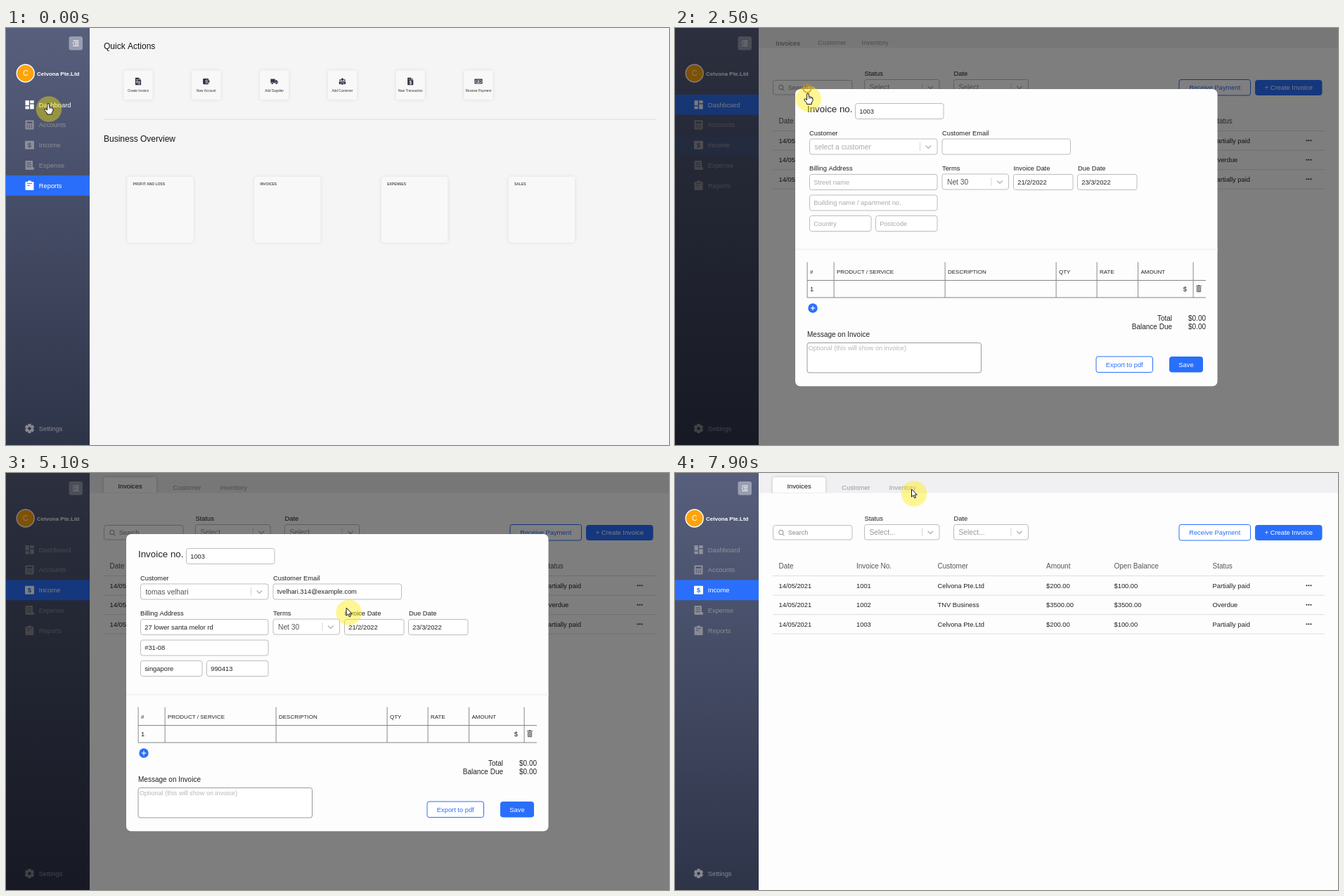
These frames come from a looping animation (943x594 px, 8 s). An HTML page with a canvas:

```html
<!DOCTYPE html>
<html lang="en">
<head>
<meta charset="utf-8">
<title>Accounting dashboard</title>
<style>
html, body { margin: 0; width: 100%; height: 100%; overflow: hidden; background: #f5f5f5; }
canvas { display: block; }
</style>
</head>
<body>
<canvas id="stage" width="943" height="594"></canvas>
<script>
const W = 943, H = 594, LOOP = 8000, TAU = Math.PI * 2;
const ctx = document.getElementById('stage').getContext('2d');
const FONT = '"Liberation Sans", Arial, sans-serif';
const BLUE = '#2a6ffb', INK = '#2f3447', GREY = '#d2d2d2', TEAL = '#00c4ac';
const FIRM = 'Celvona Pte.Ltd', CLIENT = 'tomas velhari';

const OPEN = 2450, CLOSE = 7260, PICK = 4600, ADD = 6380;

const clamp = v => Math.max(0, Math.min(1, v));
const ramp = (t, a, b) => clamp((t - a) / (b - a));
const outQuad = p => 1 - (1 - p) ** 2;
const outQuart = p => 1 - (1 - p) ** 4;
const smooth = p => p * p * (3 - 2 * p);
const mix = (a, b, p) => a + (b - a) * p;

function text(s, x, y, size = 9.33, color = '#222', align = 'left', weight = '') {
  ctx.font = `${weight} ${size}px ${FONT}`;
  ctx.fillStyle = color;
  ctx.textAlign = align;
  ctx.fillText(s, x, y + size * 0.355);
}
function rect(x, y, w, h, color) {
  ctx.fillStyle = color;
  ctx.fillRect(x, y, w, h);
}
function box(x0, y0, x1, y1, r, fill, stroke, width = 1) {
  ctx.beginPath();
  ctx.roundRect(x0, y0, x1 - x0, y1 - y0, r);
  if (fill) { ctx.fillStyle = fill; ctx.fill(); }
  if (stroke) { ctx.strokeStyle = stroke; ctx.lineWidth = width; ctx.stroke(); }
}
function line(points, color, width = 1) {
  ctx.beginPath();
  points.forEach(([x, y]) => ctx.lineTo(x, y));
  ctx.strokeStyle = color;
  ctx.lineWidth = width;
  ctx.stroke();
}
function disc(x, y, r, color) {
  ctx.beginPath();
  ctx.arc(x, y, r, 0, TAU);
  ctx.fillStyle = color;
  ctx.fill();
}
function shadowed(blur, alpha, draw) {
  ctx.save();
  ctx.shadowColor = `rgba(0,0,0,${alpha})`;
  ctx.shadowBlur = blur;
  draw();
  ctx.restore();
}
function at(x, y, scale, draw) {
  ctx.save();
  ctx.translate(x, y);
  ctx.scale(scale, scale);
  draw();
  ctx.restore();
}
function chevron(x, y, color) {
  line([[x - 3.8, y - 1.9], [x, y + 1.9], [x + 3.8, y - 1.9]], color, 1.4);
}

// ---- sidebar ----
const navIcons = [
  c => { rect(-6, -6, 5.3, 7, c); rect(-6, 2.3, 5.3, 4, c); rect(.7, -6, 5.5, 4, c); rect(.7, -.7, 5.5, 7, c); },
  (c, bg) => {
    box(-6, -6.5, 6, 6.5, 1, c);
    rect(-4, -4.5, 8, 2.4, bg);
    for (let i = 0; i < 9; i++) rect(-4 + i % 3 * 3, -.5 + (i / 3 | 0) * 2, 1.8, 1.2, bg);
  },
  (c, bg) => { box(-6.5, -6, 6.5, 6, 1, c); text('$', 0, 0, 9.5, bg, 'center', 'bold'); },
  (c, bg) => {
    box(-6, -6.5, 4.5, 6.5, 1, c);
    for (let i = 0; i < 3; i++) rect(-4, -4 + i * 2.7, 6.5, 1, bg);
    disc(4.5, 4.5, 2.2, c);
  },
  (c, bg) => {
    box(-6, -5.5, 6, 6.5, 1, c);
    box(-2.5, -7, 2.5, -3.5, 1, c);
    rect(-3.5, -3.6, 7, 1, bg);
    rect(-3.5, -.6, 4, 1, bg);
  },
  (c, bg) => {
    for (let i = 0; i < 6; i++) {
      ctx.save(); ctx.rotate(i * TAU / 6); rect(-2.2, -6.6, 4.4, 4, c); ctx.restore();
    }
    disc(0, 0, 5, c); disc(0, 0, 2.2, bg);
  }
];
const navNames = ['Dashboard', 'Accounts', 'Income', 'Expense', 'Reports', 'Settings'];

function sidebarWidth(t) {
  const shut = smooth(ramp(t, 1000, 1200)), back = outQuad(ramp(t, 1600, 1780));
  return 119 - 79 * (shut - back);
}
function sidebar(t, sw) {
  ctx.save();
  ctx.beginPath();
  ctx.rect(0, 0, sw, H);
  ctx.clip();
  const g = ctx.createLinearGradient(0, 0, 0, H);
  g.addColorStop(0, '#575f7d');
  g.addColorStop(1, '#2e3448');
  rect(0, 0, sw, H, g);

  box(sw - 29.5, 12, sw - 10, 31.5, 3, 'rgba(255,255,255,.4)');
  for (let i = 0; i < 4; i++) {
    const inner = i % 3 ? 2.5 : 0;
    rect(sw - 23.5 + inner, 17.7 + i * 2.4, 8 - inner, 1, '#fff');
  }
  line([[sw - 22, 20], [sw - 24, 21.8], [sw - 22, 23.6]], '#fff', .9);

  const show = ramp(sw, 55, 95), ax = Math.max(20, sw / 2 - 31.8);
  disc(ax, 64.5, 13.2, '#fff');
  disc(ax, 64.5, 11.8, '#ffa30a');
  text('C', ax, 64.5, 10.5, '#fff', 'center');
  ctx.globalAlpha = show;
  text(FIRM, ax + 16.3, 64.7, 8, '#fff', 'left', 'bold');
  ctx.globalAlpha = 1;

  const first = ramp(t, 0, 250), second = ramp(t, 2470, 2750);
  const active = [first * (1 - second), 0, second, 0, 1 - first, 0];
  const hover = [t < 420 ? 1 : 0, 0, 0, 0, 0, 0];
  const ix = 20 + 13.5 * ((sw - 40) / 79) ** 2.5;
  navNames.forEach((name, i) => {
    const y = i < 5 ? 109.2 + i * 28.8 : 570.5;
    ctx.globalAlpha = active[i];
    rect(0, y - 14.4, sw, 28.8, BLUE);
    ctx.globalAlpha = 1;
    const lit = Math.max(active[i], hover[i]);
    const shade = Math.round(mix(146 - i * 2, 255, lit));
    const color = `rgb(${shade},${shade},${Math.min(255, shade + 8)})`;
    const back = active[i] > .5 ? BLUE : i < 5 ? '#4b5370' : '#30364b';
    at(ix, y, 1, () => navIcons[i](color, back));
    ctx.globalAlpha = show;
    text(name, ix + 13.3, y, 9.33, color);
    ctx.globalAlpha = 1;
  });
  ctx.restore();
}

// ---- dashboard ----
function sheet() {
  ctx.beginPath();
  ctx.moveTo(-7, -9); ctx.lineTo(2, -9); ctx.lineTo(7, -4); ctx.lineTo(7, 9); ctx.lineTo(-7, 9);
  ctx.fillStyle = INK;
  ctx.fill();
  line([[2, -9], [2, -4], [7, -4]], '#f8f8f8', 1);
}
const quick = [
  ['Create Invoice', () => {
    sheet();
    rect(-4.5, -5, 4, 1.2, '#f8f8f8'); rect(-4.5, -2.5, 4, 1.2, '#f8f8f8');
    rect(-4.5, 0, 9, 4, '#f8f8f8'); rect(-3.3, 1.2, 6.6, 1.6, INK); rect(0, 5.8, 4.5, 1.2, '#f8f8f8');
  }],
  ['New Account', () => {
    box(-8, -7, 6, 7, 2, INK);
    box(-1.5, -4, 9, 4, 1.5, '#f8f8f8');
    box(-.2, -3, 8, 3, 1, INK);
    disc(3, 0, 1.2, '#f8f8f8');
  }],
  ['Add Supplier', () => {
    rect(-9, -6, 11, 10, INK);
    ctx.beginPath();
    ctx.moveTo(2.5, -3); ctx.lineTo(6, -3); ctx.lineTo(9, 1); ctx.lineTo(9, 4.5); ctx.lineTo(2.5, 4.5);
    ctx.fill();
    for (const x of [-5, 5]) { disc(x, 4.5, 3, '#f8f8f8'); disc(x, 4.5, 2.2, INK); }
  }],
  ['Add Customer', () => {
    for (const x of [-5.5, 5.5]) { disc(x, -3, 2, INK); box(x - 2.5, 0, x + 2.5, 7, 2, INK); }
    box(-4, .5, 4, 9, 3, '#f8f8f8');
    disc(0, -5, 3, INK);
    box(-3.2, -.8, 3.2, 8, 2.5, INK);
    rect(-.5, 0, 1, 5, '#f8f8f8');
  }],
  ['New Transaction', () => {
    sheet();
    rect(-4.5, -5.8, 4, 1.1, '#f8f8f8');
    text('$', 0, 2.3, 11, '#f8f8f8', 'center', 'bold');
  }],
  ['Receive Payment', () => {
    box(-9.5, -6, 9.5, 6, 1, INK);
    box(-7.5, -4, 7.5, 4, 3, '#f8f8f8');
    box(-6.3, -3, 6.3, 3, 2.5, INK);
    disc(0, 0, 2.6, '#f8f8f8');
    rect(-.6, -1.5, 1.2, 3, INK);
  }]
];

function legend(y, label, color) {
  ctx.font = `8px ${FONT}`;
  const half = (ctx.measureText(label).width + 30) / 2;
  rect(-half, y - 3.6, 25.5, 7, color);
  text(label, -half + 30, y, 8, '#666');
}
function ringChart(part, color, hole, p) {
  const y = 28, top = -Math.PI / 2, cut = top + TAU * part * p;
  const slice = (from, to, fill) => {
    ctx.beginPath();
    ctx.arc(0, y, 48, from, to);
    if (hole) ctx.arc(0, y, hole, to, from, true); else ctx.lineTo(0, y);
    ctx.closePath();
    ctx.fillStyle = fill;
    ctx.fill();
    ctx.strokeStyle = '#fff';
    ctx.lineWidth = 1.4;
    ctx.stroke();
  };
  if (p <= 0) return;
  slice(top, cut, GREY);
  slice(cut, top + TAU * p, color);
}
function barChart(p) {
  box(-28.5, -22, -1.5, -14, 0, BLUE, '#111', 1.4);
  text('invoice', 2.5, -18, 8, '#666');
  [100, 50, 0].forEach((v, i) => {
    const y = -7.5 + i * 13.4;
    text(v, -51.5, y, 8, '#666', 'right');
    rect(-48, y, 114, .8, i < 2 ? '#e7e7e7' : '#d4d4d4');
  });
  for (const x of [-44.3, 10.7, 65.8]) rect(x, -7.5, .8, 31, '#e4e4e4');
  [['Overdue', 17.2, -16.5], ['Deposited', 15.6, 38.8]].forEach(([name, h, x]) => {
    const top = 19.5 - h * p;
    rect(x - 20, top, 40, h * p, BLUE);
    line([[x - 20, 19.5], [x - 20, top], [x + 20, top], [x + 20, 19.5]], '#111', 1.4);
    text(name, x, 31.5, 8, '#666', 'center');
  });
}
const cards = [
  ['PROFIT AND LOSS', p => {
    legend(-46.8, 'income', GREY); legend(-32.2, 'Expense', BLUE); ringChart(.52, BLUE, 24.5, p);
  }],
  ['INVOICES', barChart],
  ['EXPENSES', p => {
    legend(-46.8, '$100.00 Cost of Sales', GREY); legend(-32.2, '$20.00 Expense', TEAL); ringChart(.2, TEAL, 24.5, p);
  }],
  ['SALES', p => {
    legend(-46.8, 'income', GREY); legend(-32.2, 'Expense', BLUE); ringChart(.52, BLUE, 0, p);
  }]
];

function dashboard(t, sw) {
  const left = sw + 20, grow = mix(.58, 1, outQuad(ramp(t, 0, 280)));
  rect(0, 0, W, H, '#f5f5f5');
  text('Quick Actions', left, 25.3, 12, '#151515');
  text('Business Overview', left, 157.3, 12, '#151515');
  rect(left, 129.7, 924 - left, 1, '#dcdcdc');
  const step = 96.8 + (119 - sw) * .0375;
  quick.forEach(([name, icon], i) => at(sw + 69 + i * step, 81.2, grow, () => {
    shadowed(5, .1, () => box(-35.5, -35.5, 35.5, 35.5, 6, '#f8f8f8'));
    at(0, -8.8, 1, icon);
    text(name, 0, 14.5, 8, '#333', 'center');
  }));
  const chart = outQuart(ramp(t, 90, 800));
  cards.forEach(([name, draw], i) => at(sw + 100.5 + i * 180.8, 258.7, grow, () => {
    shadowed(5, .1, () => box(-81, -80.5, 81, 80.5, 7, '#f8f8f8'));
    text(name, -66.8, -62.3, 8.56, '#555', 'left', 'bold');
    if (t >= 90) draw(chart);
  }));
}

// ---- income page ----
function select(x0, y0, x1, y1, label, color, sep = x1 - 25) {
  box(x0, y0, x1, y1, 3, '#fff', '#bdbdbd');
  text(label, x0 + 7, (y0 + y1) / 2, 10.25, color);
  rect(sep, y0 + 5, .8, y1 - y0 - 10, '#ccc');
  chevron(x1 - 12.6, (y0 + y1) / 2 + .3, '#b5b5b5');
}
function button(x0, y0, x1, y1, label, solid) {
  box(x0, y0, x1, y1, 3, solid ? BLUE : '#fff', BLUE);
  text(label, (x0 + x1) / 2, (y0 + y1) / 2, 9.33, solid ? '#fff' : BLUE, 'center');
}
function incomePage(t) {
  rect(0, 0, W, H, '#fdfdfd');
  rect(119, 0, W - 119, 28.5, '#f0f0f2');
  const p = smooth(ramp(t, 2500, 2680));
  ctx.globalAlpha = p;
  ctx.save();
  ctx.beginPath();
  ctx.rect(119, 0, 300, 28.5);
  ctx.clip();
  shadowed(4, .2, () => box(139, 6, mix(182, 214, p), 34, 4, '#fdfdfd'));
  ctx.restore();
  ctx.globalAlpha = 1;
  const ink = Math.round(mix(110, 20, p));
  text('Invoices', mix(160.7, 176.5, p), mix(21.5, 19, p), 9.33, `rgb(${ink},${ink},${ink})`, 'center');
  text('Customer', mix(223.5, 257.5, p), 21, 9.33, '#999', 'center');
  text('Inventory', mix(284.5, 323.7, p), 21, 9.33, '#999', 'center');

  text('Status', 269.5, 64.3);
  text('Date', 396.5, 64.3);
  box(139.5, 74.5, 252, 95, 3, '#fff', '#bdbdbd');
  ctx.beginPath();
  ctx.arc(150.8, 84.5, 3.2, 0, TAU);
  ctx.strokeStyle = '#888';
  ctx.lineWidth = 1;
  ctx.stroke();
  line([[153, 87], [155.5, 89.5]], '#888');
  text('Search', 160.8, 84.8, 9, '#888');
  select(269.5, 73.5, 376, 95, 'Select...', '#999');
  select(396.5, 73.5, 502.5, 95, 'Select...', '#999');
  button(717, 73.5, 818.5, 96, 'Receive Payment', false);
  button(825.5, 74.5, 920, 95.5, '+ Create Invoice', true);

  const cols = [147.5, 258, 373.5, 528, 624.5, 764.5];
  ['Date', 'Invoice No.', 'Customer', 'Amount', 'Open Balance', 'Status']
    .forEach((s, i) => text(s, cols[i], 132.5, 10, '#555'));
  const part = n => ['14/05/2021', n, FIRM, '$200.00', '$100.00', 'Partially paid'];
  [part('1001'), ['14/05/2021', '1002', 'TNV Business', '$3500.00', '$3500.00', 'Overdue'], part('1003')]
    .forEach((row, r) => {
      const y = 160.2 + r * 27.5;
      row.forEach((s, i) => text(s, cols[i], y));
      for (let i = -1; i < 2; i++) disc(901.5 + i * 3, y, 1, '#222');
      rect(139, y + 13.4, 785, 1, '#dedede');
    });
  rect(139, 146, 785, 1, '#dedede');
}

// ---- invoice form ----
function field(x0, y0, x1, value, hint) {
  box(x0 + .5, y0 + .5, x1, y0 + 22.5, 3, '#fff', '#bcbcbc');
  text(value || hint || '', x0 + 6.2, y0 + 11.6, 9.33, value ? '#222' : '#aaa');
}
function trash(x, y) {
  rect(x - 4, y - 4.2, 8, 1.2, '#666');
  rect(x - 1.4, y - 5.2, 2.8, 1.2, '#666');
  box(x - 3.2, y - 2.4, x + 3.2, y + 5, 1, '#777');
  for (const d of [-1.8, 0, 1.8]) rect(x + d - .3, y - 1.4, .6, 5, '#ddd');
}
function modal(t, pointerY) {
  rect(0, 0, W, H, 'rgba(0,0,0,.5)');
  const rows = t >= ADD ? 2 : 1, extra = (rows - 1) * 24, done = t >= PICK;
  const menu = t >= 3750 && !done;
  ctx.save();
  ctx.translate(0, -extra / 2);
  box(171, 87, 771.5, 510.3 + extra, 7, '#fdfdfd');
  text('Invoice no.', 188, 115.5, 13.33);
  field(256, 107, 382, '1003');

  text('Customer', 191, 149.5);
  text('Customer Email', 380, 149.5);
  select(191.5, 158, 373, 180, done ? CLIENT : 'select a customer', done ? '#555' : '#aaa');
  field(379.5, 157.5, 562.5, done && 'tvelhari.314@example.com');
  text('Billing Address', 191, 199.7);
  field(191, 208, 373, done && '27 lower santa melor rd', 'Street name');
  field(191, 237.5, 373, done && '#31-08', 'Building name / apartment no.');
  field(191, 267, 279, done && 'singapore', 'Country');
  field(285, 267, 373, done && '990413', 'Postcode');
  text('Terms', 380, 199.7);
  select(380, 208, 474.5, 230, 'Net 30', '#555');
  text('Invoice Date', 481.5, 199.7);
  field(481, 208, 566, '21/2/2022');
  text('Due Date', 573, 199.7);
  field(572, 208, 657, '23/3/2022');
  rect(171, 314, 600.5, 3, '#f5f5f5');

  const bars = [188, 226, 384, 542, 600, 658.5, 737];
  ['#', 'PRODUCT / SERVICE', 'DESCRIPTION', 'QTY', 'RATE', 'AMOUNT']
    .forEach((s, i) => text(s, bars[i] + 4, 347, 8));
  for (const x of bars) rect(x - .4, 333.5, 1, 50.5 + extra, '#8a8a8a');
  rect(188, 359, 567, 1, '#858585');
  for (let r = 0; r < rows; r++) {
    const y = 372 + r * 24.2;
    text(r + 1, 192, y);
    text('$', 728, y, 9.33, '#222', 'right');
    trash(745, y - .8);
    rect(188, y + 11.5, 567, 1, '#858585');
  }

  ctx.translate(0, extra);
  disc(196, 399, 6.7, BLUE);
  rect(192.8, 398.4, 6.4, 1.2, '#fff');
  rect(195.4, 395.8, 1.2, 6.4, '#fff');
  text('Total', 707, 413.8, 10, '#222', 'right');
  text('$0.00', 755, 413.8, 10, '#222', 'right');
  text('Balance Due', 707, 425.5, 10, '#222', 'right');
  text('$0.00', 755, 425.5, 10, '#222', 'right');
  text('Message on Invoice', 188, 436.8, 10);
  box(188, 448.5, 435.5, 491, 3, '#fff', '#999');
  text('Optional (this will show on invoice)', 189.7, 455.8, 9.12, '#b3bab8');
  button(599, 468, 679.5, 490.5, 'Export to pdf', false);
  button(703.5, 468.5, 750.5, 490, 'Save', true);
  ctx.restore();

  if (menu) {
    box(191.5, 158, 373, 180, 3, null, BLUE, 1.7);
    rect(197, 163, .9, 12, '#333');
    chevron(360.4, 169.3, '#555');
    shadowed(5, .3, () => box(191, 185, 373, 226, 3, '#fff'));
    const low = pointerY > 205;
    rect(191, low ? 205 : 187, 182, 18, '#dee9fc');
    text('nils vorn', 194.5, 196.3);
    text(CLIENT, 194.5, 213.8);
  }
}

// ---- pointer: time and centre of the halo ----
const path = [
  [0, 61, 115.5], [300, 61, 115], [800, 103, 28], [1050, 103, 28], [1400, 22, 31], [1600, 22, 31],
  [1700, 82, 32], [1950, 130, 50], [2300, 191.5, 92.5], [2400, 191.5, 92.5], [2500, 190, 101],
  [2750, 190, 101], [3550, 338, 170], [3750, 360, 174], [3900, 350, 180], [4350, 288.5, 222],
  [4700, 288.5, 222], [5000, 480, 178], [5400, 528, 308], [5580, 642, 365], [5760, 400, 425],
  [5900, 207, 385], [6100, 195, 404], [6450, 195, 404], [7000, 849, 327], [7250, 849, 327],
  [7850, 340, 29.5], [8000, 340, 29.5]
];
const clicks = [[980, 99.5, 21.5], [1580, 18, 24.5], [2380, 188, 86], [3740, 356, 167], [4580, 285, 215.5],
  [6350, 192, 398], [7130, 845.5, 320.5]];

function pointer(t) {
  const i = path.findIndex(k => k[0] > t), a = path[i - 1], b = path[i];
  const p = smooth(ramp(t, a[0], b[0]));
  return [mix(a[1], b[1], p), mix(a[2], b[2], p)];
}
function shape(points) {
  ctx.beginPath();
  points.forEach(([x, y]) => ctx.lineTo(x, y));
  ctx.closePath();
  ctx.fillStyle = '#fff';
  ctx.fill();
  ctx.strokeStyle = '#111';
  ctx.lineWidth = 1;
  ctx.stroke();
}
function cursor(t, x, y) {
  disc(x, y, 18.3, 'rgba(255,235,0,.41)');
  for (const [start, cx, cy] of clicks) {
    const age = t - start;
    if (age < 0 || age > 220) continue;
    ctx.beginPath();
    ctx.arc(cx, cy, mix(7.5, 4.2, age / 220), 0, TAU);
    ctx.strokeStyle = `rgba(${t < 2000 ? '130,25,35' : '225,140,0'},.75)`;
    ctx.lineWidth = 1.8;
    ctx.stroke();
  }
  const within = (a, b) => t >= a && t < b;
  if (within(5820, 6020)) {
    line([[x - 2.5, y - 5.5], [x, y - 5], [x, y + 5], [x - 2.5, y + 5.5]], '#222', 1.2);
    line([[x + 2.5, y - 5.5], [x, y - 5], [x, y + 5], [x + 2.5, y + 5.5]], '#222', 1.2);
  } else if (t < 420 || within(2150, 2640) || within(6020, 6500)) {
    at(x - 1, y - 8, 1, () => {
      shape([[-1.3, .6], [0, 0], [1.3, .6], [1.5, 5], [3.5, 5.2], [5.8, 6], [7, 7.2], [7, 10.5],
        [5.4, 13], [5.3, 15.5], [-1.5, 15.5], [-1.8, 13.6], [-5, 9.8], [-4.8, 8], [-3.3, 8], [-1.4, 9.5]]);
      for (const d of [1.5, 3.5, 5.4]) line([[d, 5.5], [d, 8]], '#222', .7);
    });
  } else {
    at(x - 3.5, y - 6.5, 1, () =>
      shape([[0, 0], [0, 11], [2.5, 8.7], [4.2, 12.7], [6, 11.9], [4.3, 8.1], [7.8, 8]]));
  }
}

function frame(now) {
  const t = now % LOOP, sw = sidebarWidth(t), [x, y] = pointer(t);
  if (t < OPEN) dashboard(t, sw); else incomePage(t);
  sidebar(t, sw);
  if (t >= OPEN && t < CLOSE) modal(t, y - 6.5);
  cursor(t, x, y);
}
const start = performance.now();
function tick() {
  frame(performance.now() - start);
  requestAnimationFrame(tick);
}
tick();
</script>
</body>
</html>
```
